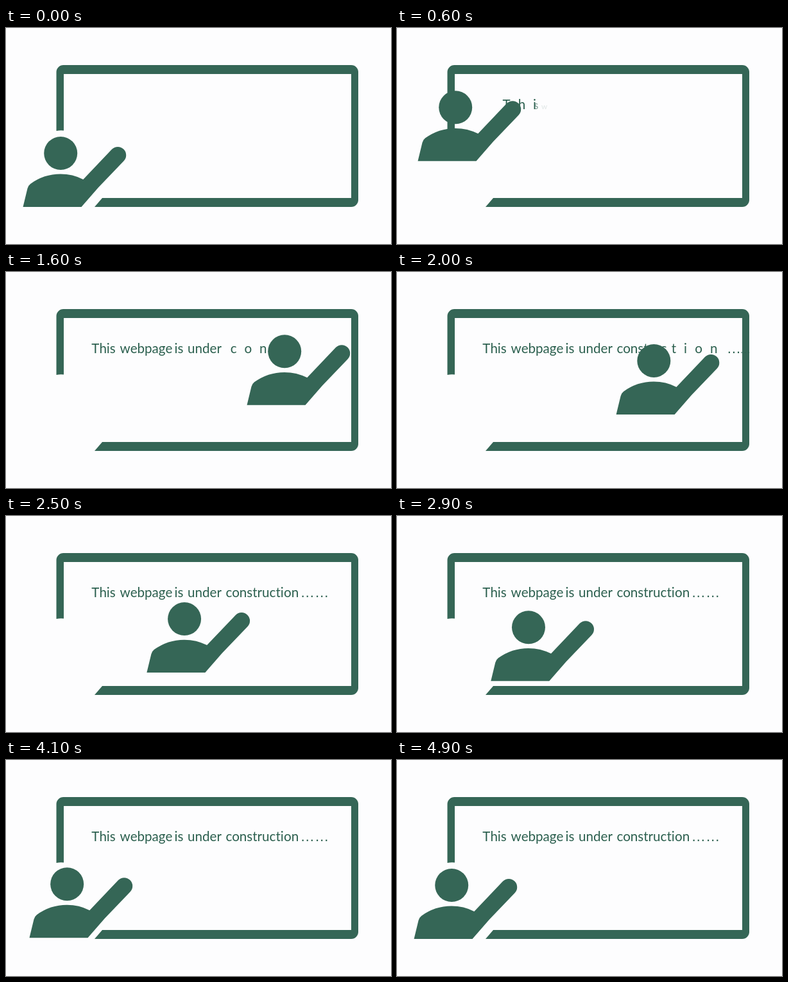
These frames come from a looping animation (600 px wide and 338 px high, 5 s). An HTML page with a canvas:

```html
<!DOCTYPE html>
<html lang="en">
<head>
<meta charset="utf-8">
<title>Under construction</title>
<style>
  html, body { margin: 0; width: 100%; height: 100%; overflow: hidden; background: #fdfdfe; }
  canvas { display: block; width: 600px; height: 338px; }
</style>
</head>
<body>
<canvas id="stage" width="600" height="338"></canvas>
<script>
const ctx = document.getElementById('stage').getContext('2d');
const LOOP = 5000, STEP = 100;
const GREEN = '#356656', INK = '#2b5f4e', PAPER = '#fdfdfe';
const SANS = '20.6px Lato, "Open Sans", sans-serif';
const DOTS = '22.4px "Liberation Sans", Arial, sans-serif';

const board = new Path2D(
  'M78.5 161V69a11 11 0 0 1 11-11H538a11 11 0 0 1 11 11V269a11 11 0 0 1-11 11' +
  'H138L150 266H538V72H90V160.5Q84.5 159.6 78.5 161Z');
const body = new Path2D(
  'M26.5 280L33.5 251Q34.6 246.6 38 244Q59 228.6 85 228.6Q104 228.6 120.3 237' +
  'L165 189.8A13 13 0 0 1 183.4 208.2L144 249.5L117.5 280Z');
const head = new Path2D();
head.arc(85.2, 196, 26, 0, 7);

// Words at their left edges, split into letters with resting positions
const words = [[133.3, 'This'], [177.5, 'webpage'], [262.5, 'is'], [283, 'under'], [342.5, 'construction']];
const letters = [];
ctx.font = SANS;
for (const [x, word] of words) {
  [...word].forEach((ch, i) => {
    letters.push({ ch, font: SANS, x: x + ctx.measureText(word.slice(0, i)).width });
  });
}
for (const x of [458.5, 481]) letters.push({ ch: '…', font: DOTS, x });
for (const l of letters) {
  ctx.font = l.font;
  l.half = ctx.measureText(l.ch).width / 2;
}

const clamp = v => Math.min(1, Math.max(0, v));

// Piecewise linear interpolation through [time, value] pairs
function along(points, t) {
  const i = Math.max(1, points.findIndex(p => p[0] >= t));
  const [t0, a] = points[i - 1], [t1, b] = points[i];
  return a + (b - a) * (t - t0) / (t1 - t0);
}

const sweep = [[0, 0], [583, 0], [1100, 182], [1200, 217], [1600, 349], [1700, 389], [1730, 393]];

function personAt(t) {
  if (t < 1730) return [along(sweep, t), -71.7 * clamp(t / 580)];
  const x = Math.pow(0.00356 * Math.max(0, 4805 - t), 2.5);
  return [x, -0.181 * x];
}

// Each letter fades and grows in, then slides left to rest
function drawLetter(l, k, t) {
  const left = Math.max(0, 730 + 50 * k - t);
  const grown = clamp((345 - left) / 110);
  if (!grown) return;
  const shift = left < 235 ? left * 0.24 : 56.4 - (left - 235) * 0.13;
  const scale = 0.5 + 0.5 * grown;
  ctx.save();
  ctx.globalAlpha = grown;
  ctx.font = l.font;
  ctx.translate(l.x + l.half + shift, 127);
  ctx.scale(scale, scale);
  ctx.fillText(l.ch, -l.half, 0);
  ctx.restore();
}

function draw(t) {
  ctx.fillStyle = PAPER;
  ctx.fillRect(0, 0, 600, 338);
  ctx.fillStyle = GREEN;
  ctx.fill(board);
  ctx.fillStyle = INK;
  letters.forEach((l, k) => drawLetter(l, k, t));
  ctx.fillStyle = GREEN;
  ctx.save();
  ctx.translate(...personAt(t));
  ctx.fill(head);
  ctx.fill(body);
  ctx.restore();
}

let start;
function tick(now) {
  start ??= now;
  // Ten pictures a second, with a little slack for late frames
  draw(Math.floor((now - start + 20) / STEP) * STEP % LOOP);
  requestAnimationFrame(tick);
}
draw(0);
requestAnimationFrame(tick);
</script>
</body>
</html>
```
